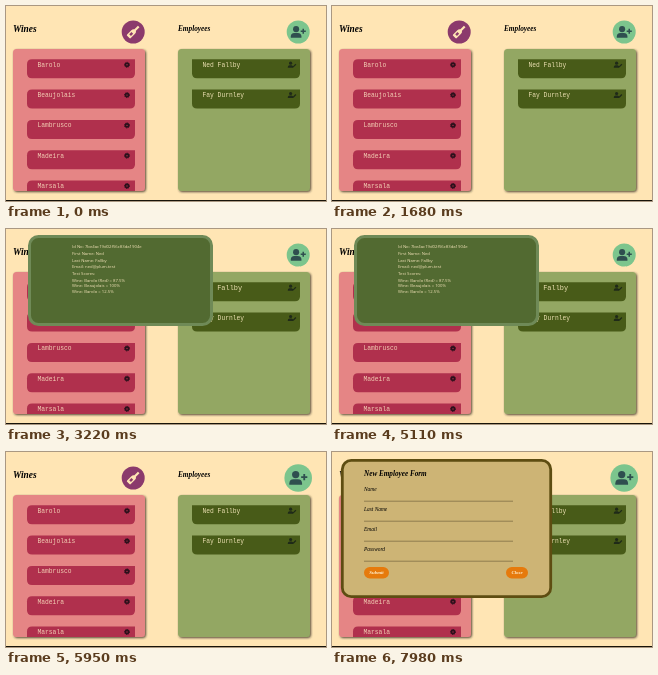
Recreate the animation shown at these times as an HTML page. Size 320 by 195 pixels, loop 8120 ms.

```html
<!DOCTYPE html>
<html lang="en">
<head>
<meta charset="utf-8">
<title>Wines and employees</title>
<style>
html, body { margin: 0; width: 100%; height: 100%; overflow: hidden; background: #ffe5b4; }
svg { display: block; width: 100%; height: 100%; }
.script { font-family: "Liberation Serif", cursive; font-style: italic; }
.bold { font-weight: bold; }
.type { font: 6.3px "Liberation Mono", monospace; }
.info { font: 4.25px "Open Sans", sans-serif; fill: #f3e3b9; }
</style>
</head>
<body>
<svg id="stage" viewBox="0 0 320 195">
  <defs>
    <filter id="shade" x="-10%" y="-10%" width="120%" height="120%">
      <feDropShadow dx="1" dy="1" stdDeviation=".8" flood-color="#2b2415" flood-opacity=".8"/>
    </filter>
    <clipPath id="list"><rect x="7" y="43" width="132" height="142" rx="3.5"/></clipPath>
    <g id="gear" fill="#2a101b">
      <circle r="2.4"/>
      <circle r="2.5" fill="none" stroke="#2a101b" stroke-width="1" stroke-dasharray="1.1 .86"/>
      <circle r=".7" fill="#b0304d"/>
    </g>
    <g id="edit" fill="#1f2a18">
      <circle cx="-1.4" cy="-1.6" r="1.6"/>
      <path d="M-4.2 3V2.2Q-4.2.4-2.4.4H-.3L1.2 1.4V3Z"/>
      <path d="M1 1.4 3.4-1 4.3-.1 1.9 2.3.8 2.6Z"/>
    </g>
  </defs>
  <rect width="320" height="195" fill="#ffe5b4"/>
  <text class="script bold" x="7" y="25.6" font-size="9.4">Wines</text>
  <text class="script bold" x="172" y="25.4" font-size="7.3">Employees</text>
  <g transform="translate(127.2 26)">
    <circle r="11.5" fill="#8b3a6c"/>
    <g transform="rotate(45)" fill="#ffe5b4">
      <path d="M-1.1-7.8H1.1V-2.8Q2.6-1.8 2.6 0V6Q2.6 7 1.6 7H-1.6Q-2.6 7-2.6 6V0Q-2.6-1.8-1.1-2.8Z"/>
      <rect x="-1.2" y="1.2" width="2.4" height="3.2" fill="#8b3a6c"/>
    </g>
  </g>
  <g id="add">
    <circle r="11.5" fill="#7cc58d"/>
    <g fill="#2f4f4f" transform="scale(.95)">
      <circle cx="-2.2" cy="-3" r="3.2"/>
      <path d="M-7.8 6V4.8Q-7.8 1-4 1H-.4Q3.4 1 3.4 4.8V6Z"/>
      <path d="M4.5-3.5H6.1V-1.6H8V0H6.1V1.9H4.5V0H2.6V-1.6H4.5Z"/>
    </g>
  </g>
  <rect x="7" y="43" width="132" height="142" rx="3.5" fill="#e58585" filter="url(#shade)"/>
  <rect x="172" y="43" width="132" height="142" rx="3.5" fill="#93a764" filter="url(#shade)"/>
  <g id="wines" clip-path="url(#list)"></g>
  <g id="staff"></g>
  <g id="details">
    <rect x="23.5" y="7.5" width="182" height="88" rx="9" fill="#526a31" stroke="#6f8a57" stroke-width="3"/>
  </g>
  <g id="form">
    <rect x="10.3" y="8.3" width="208.4" height="136.4" rx="9" fill="#cdb475" stroke="#5e4d12" stroke-width="2.8"/>
    <text class="script bold" x="32" y="24" font-size="7.2">New Employee Form</text>
  </g>
  <path d="M0 194.5H320" stroke="#171309"/>
</svg>
<script>
const LOOP = 8120;
const $ = id => document.getElementById(id);

function add(parent, tag, attrs, text) {
  const el = document.createElementNS("http://www.w3.org/2000/svg", tag);
  for (const key in attrs) el.setAttribute(key, attrs[key]);
  if (text) el.textContent = text;
  return parent.appendChild(el);
}

// Card with square upper corners; the left one can be rounded.
function card(parent, x, y, name, { fill, ink, round, icon }) {
  const start = round ? "m5 0h103" : "m0 0h108";
  const corner = round ? "v-9q0-5 5-5z" : "v-14z";
  add(parent, "path", { d: `M${x} ${y}${start}v14q0 5-5 5h-98q-5 0-5-5${corner}`, fill });
  add(parent, "use", { href: icon, x: x + 100, y: y + 5.5 });
  return add(parent, "text", { class: "type", x: x + 10.5, y: y + 7.4, fill: ink }, name);
}

const wine = { fill: "#b0304d", ink: "#f3cfb4", round: true, icon: "#gear" };
const person = { fill: "#485b18", ink: "#ece0b2", round: false, icon: "#edit" };
const rowY = i => 53.3 + i * 30.3;

["Barolo", "Beaujolais", "Lambrusco", "Madeira", "Marsala"].forEach((name, i) =>
  card($("wines"), 21, rowY(i), name, wine));
const [hovered] = ["Ned Fallby", "Fay Durnley"].map((name, i) =>
  card($("staff"), 186, rowY(i), name, person));

[
  [18.5, "Id No: 7be4ac19d02f56c83da1904e"],
  [25.6, "First Name: Ned"],
  [32.5, "Last Name: Fallby"],
  [39.4, "Email: ned@plum.test"],
  [46.2, "Test Scores:"],
  [52.6, "Wine: Barolo (Red) = 87.5%"],
  [58.4, "Wine: Beaujolais = 100%"],
  [64.2, "Wine: Barolo = 12.5%"]
].forEach(([y, line]) => add($("details"), "text", { class: "info", x: 66, y }, line));

["Name", "Last Name", "Email", "Password"].forEach((label, i) => {
  const y = 38.5 + i * 20;
  add($("form"), "text", { class: "script", x: 32, y, "font-size": 5.4 }, label);
  add($("form"), "path", { d: `M32 ${y + 10.7}H181`, stroke: "#806e45", "stroke-width": .8 });
});
[[32, 25, "Submit"], [174, 22, "Close"]].forEach(([x, width, label]) => {
  add($("form"), "rect", { x, y: 115, width, height: 11.5, rx: 5.75, fill: "#e67a0c" });
  add($("form"), "text", { class: "script bold", x: x + width / 2, y: 122.3, "font-size": 4.9,
    "text-anchor": "middle", fill: "#fff0cf" }, label);
});

const between = (t, from, to) => t >= from && t < to;
function ease(t, from, to) {
  const p = Math.min(1, Math.max(0, (t - from) / (to - from)));
  return p * p * (3 - 2 * p);
}
const show = (id, on) => $(id).setAttribute("visibility", on ? "visible" : "hidden");

function draw(t) {
  const size = 1 + .2 * ease(t, 5600, 5850);
  $("add").setAttribute("transform", `translate(292.2 26) scale(${size})`);
  const grow = ease(t, 2170, 2380) - ease(t, 5460, 5670);
  hovered.setAttribute("transform", `translate(215.5 59) scale(${1 + .1 * grow}) translate(-215.5 -59)`);
  show("details", between(t, 2590, 5390));
  show("form", t >= 6720);
}

function tick() {
  draw(performance.now() % LOOP);
  requestAnimationFrame(tick);
}
tick();
</script>
</body>
</html>
```
